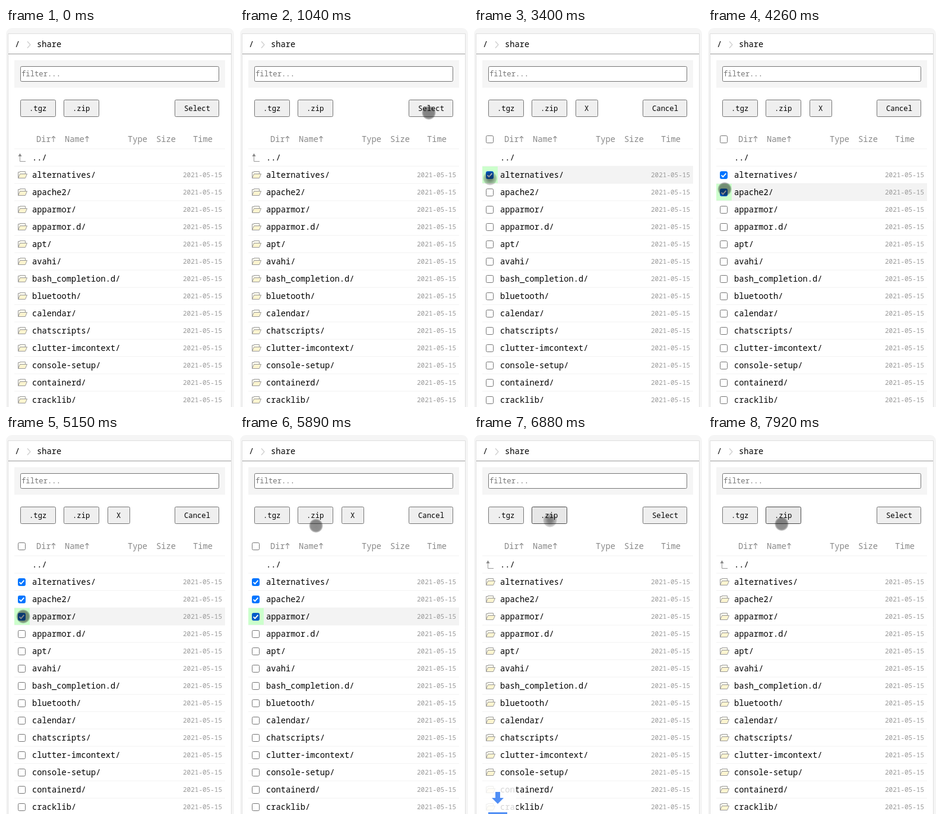
Recreate the animation shown at these times as an HTML page with a canvas. Size 384 by 635 pixels, loop 8 s.

```html
<!DOCTYPE html>
<html lang="en">
<head>
<meta charset="utf-8">
<title>share</title>
<style>
  html, body { margin: 0; width: 100%; height: 100%; overflow: hidden; background: #fff; }
  canvas { display: block; width: 384px; height: 635px; }
</style>
</head>
<body>
<canvas id="stage"></canvas>
<script>
const W = 384, H = 635, LOOP = 8000;
const ROW_TOP = 232, ROW_STEP = 29;
const SELECT_ON = 2230, SELECT_OFF = 6450;
const CHECK_TIMES = [3400, 4260, 5150];
const PRESS_TIMES = [SELECT_ON, CHECK_TIMES[0], SELECT_OFF];
const PRESS_TIME = 450;
const DROP_START = 6500, DROP_TIME = 600;
const TICK = 150;
const BLUE = '#4285f4';

const folders = ['alternatives', 'apache2', 'apparmor', 'apparmor.d', 'apt', 'avahi',
  'bash_completion.d', 'bluetooth', 'calendar', 'chatscripts', 'clutter-imcontext',
  'console-setup', 'containerd', 'cracklib'];

// Each move glides from the previous place in a number of ticks.
const entry = { x: 394, y: 139 };
const moves = [
  { at: 430, ticks: 5, x: 318, y: 142 },
  { at: 2660, ticks: 4, x: 27, y: 252 },
  { at: 3550, ticks: 3, x: 28, y: 270 },
  { at: 4410, ticks: 3, x: 29, y: 304 },
  { at: 5280, ticks: 5, x: 128, y: 152 },
  { at: 6020, ticks: 2, x: 128, y: 143 },
  { at: 7920, ticks: 1, x: 124, y: 149 }
];

const canvas = document.getElementById('stage');
const ctx = canvas.getContext('2d');
const ratio = window.devicePixelRatio || 1;
canvas.width = W * ratio;
canvas.height = H * ratio;
ctx.scale(ratio, ratio);

const mix = (a, b, p) => a + (b - a) * p;
const ease = p => p * p * (3 - 2 * p);

function text(str, x, y, size = 13.75, color = '#000') {
  ctx.font = `${size}px "Noto Sans Mono", "DejaVu Sans Mono", monospace`;
  ctx.fillStyle = color;
  ctx.fillText(str, x, y);
}

function rect(x, y, w, h, color) {
  ctx.fillStyle = color;
  ctx.fillRect(x, y, w, h);
}

function box(x, y, w, h, r, fill, stroke) {
  ctx.beginPath();
  ctx.roundRect(x + .5, y + .5, w - 1, h - 1, r);
  ctx.fillStyle = fill;
  ctx.fill();
  ctx.strokeStyle = stroke;
  ctx.lineWidth = 1;
  ctx.stroke();
}

function path(points, stroke, width = 1, fill) {
  ctx.beginPath();
  points.forEach(([x, y]) => ctx.lineTo(x, y));
  if (fill) {
    ctx.closePath();
    ctx.fillStyle = fill;
    ctx.fill();
  }
  if (stroke) {
    ctx.strokeStyle = stroke;
    ctx.lineWidth = width;
    ctx.stroke();
  }
}

function button(label, x, w, active) {
  box(x, 120, w, 29, 2, active ? '#e7e7e7' : '#efefef', active ? '#4a4a4a' : '#767676');
  text(label, x + Math.round((w - label.length * 7.33) / 2), 139, 12.22);
}

function checkbox(y, checked, hover) {
  const blue = hover ? '#005cc8' : '#0075ff';
  box(20, y, 13, 13, 2, checked ? blue : '#fff', checked ? blue : '#767676');
  if (checked) path([[22.6, y + 6.7], [25.2, y + 9.3], [30.4, y + 3.6]], '#fff', 1.9);
}

function folderIcon(y) {
  path([[20.5, y + 12.5], [20.5, y + 2.5], [23.5, y + 2.5], [23.5, y + 1.5],
    [32.5, y + 1.5], [32.5, y + 5.5]], '#999', 1, '#fffdf0');
  path([[23.5, y + 5.5], [35.5, y + 5.5], [32.5, y + 12.5], [20.5, y + 12.5], [23.5, y + 5.5]],
    '#999', 1, '#fdf5d0');
}

function upIcon() {
  path([[23.5, 213], [23.5, 223.5], [33, 223.5]], '#999');
  path([[23.5, 210], [26.5, 215], [20.5, 215]], null, 1, '#888');
}

function sortArrow(x) {
  path([[x, 191], [x, 181.5]], '#888', 1.1);
  path([[x - 3, 184.5], [x, 181.5], [x + 3, 184.5]], '#888', 1.1);
}

function drawFrame() {
  rect(0, 0, W, H, '#fff');
  ctx.beginPath();
  ctx.roundRect(0, 0, W, H + 20, 10);
  ctx.fillStyle = '#f5f5f5';
  ctx.fill();
  box(3, 9, 377, H, 0, '#fff', '#dedede');
  rect(4, 43, 375, 1, '#999');
  text('/', 15, 32);
  path([[36, 22.5], [41, 28], [36, 33.5]], '#ccc', 1.2);
  text('share', 52, 32);
  rect(14, 54, 355, 46, '#f5f5f5');
  box(24, 64, 335, 26, 2, '#fff', '#767676');
  text('filter...', 26, 81, 12.22, '#757575');
}

function drawList(t, selecting) {
  const heads = { Dir: 51, Name: 99, Type: 205, Size: 253, Time: 315 };
  for (const label in heads) text(label, heads[label], 191, 13.75, '#888');
  sortArrow(80);
  sortArrow(136.5);
  rect(14, 202, 355, 1, '#f3f3f3');
  rect(14, 231, 355, 1, '#f3f3f3');
  text('../', 44, 222);
  if (selecting) checkbox(180, false, false);
  else upIcon();

  const picked = selecting ? CHECK_TIMES.filter(c => t >= c).length : 0;
  folders.forEach((name, i) => {
    const y = ROW_TOP + i * ROW_STEP;
    const hover = i === picked - 1;
    if (hover) {
      rect(14, y, 355, 28, '#f3f3f3');
      rect(14, y, 26, 28, '#cfc');
    }
    rect(14, y + 28, 355, 1, '#f3f3f3');
    if (selecting) checkbox(y + 8, i < picked, hover);
    else folderIcon(y + 7);
    text(name + '/', 44, y + 19);
    text('2021-05-15', 298, y + 18, 11, '#999');
  });
}

function drawDownload(t) {
  const s = (t - DROP_START) / DROP_TIME;
  if (s <= 0 || s >= 1) return;
  const y = 598 + 60 * (s - .633);
  ctx.save();
  ctx.globalAlpha = 1 - 4 * (s - .5) ** 2;
  ctx.beginPath();
  ctx.roundRect(12, y - 14, 59, 62, 8);
  ctx.fillStyle = 'rgba(255,255,255,.9)';
  ctx.fill();
  path([[36, y], [44, y], [44, y + 10], [50, y + 10], [40, y + 20], [30, y + 10], [36, y + 10]],
    null, 1, BLUE);
  rect(24, y + 34, 32, 5, BLUE);
  ctx.restore();
}

function pointerAt(t) {
  let place = entry;
  for (const { at, ticks, x, y } of moves) {
    if (t < at) break;
    const step = Math.floor((t - at) / TICK) + 1;
    const p = ease(Math.min(1, step / ticks));
    place = { x: mix(place.x, x, p), y: mix(place.y, y, p) };
  }
  return place;
}

function drawPointer(t) {
  if (t < moves[0].at) return;
  const { x, y } = pointerAt(t);
  const pressed = PRESS_TIMES.some(p => t >= p && t < p + PRESS_TIME);
  const core = pressed ? .3 : .74;
  const shade = ctx.createRadialGradient(x, y, 0, x, y, 12);
  shade.addColorStop(0, 'rgba(20,20,20,.5)');
  shade.addColorStop(core, 'rgba(20,20,20,.48)');
  shade.addColorStop(.87, `rgba(20,20,20,${pressed ? .2 : .32})`);
  shade.addColorStop(1, 'rgba(20,20,20,0)');
  ctx.beginPath();
  ctx.arc(x, y, 12, 0, Math.PI * 2);
  ctx.fillStyle = shade;
  ctx.fill();
}

function draw(now) {
  const t = now % LOOP;
  const selecting = t >= SELECT_ON && t < SELECT_OFF;
  drawFrame();
  button('.tgz', 24, 60);
  button('.zip', 97, 60, t >= SELECT_OFF);
  if (selecting) button('X', 171, 38);
  button(selecting ? 'Cancel' : 'Select', 284, 75);
  drawList(t, selecting);
  drawDownload(t);
  drawPointer(t);
}

const start = performance.now();
function tick() {
  draw(performance.now() - start);
  requestAnimationFrame(tick);
}
tick();
</script>
</body>
</html>
```
